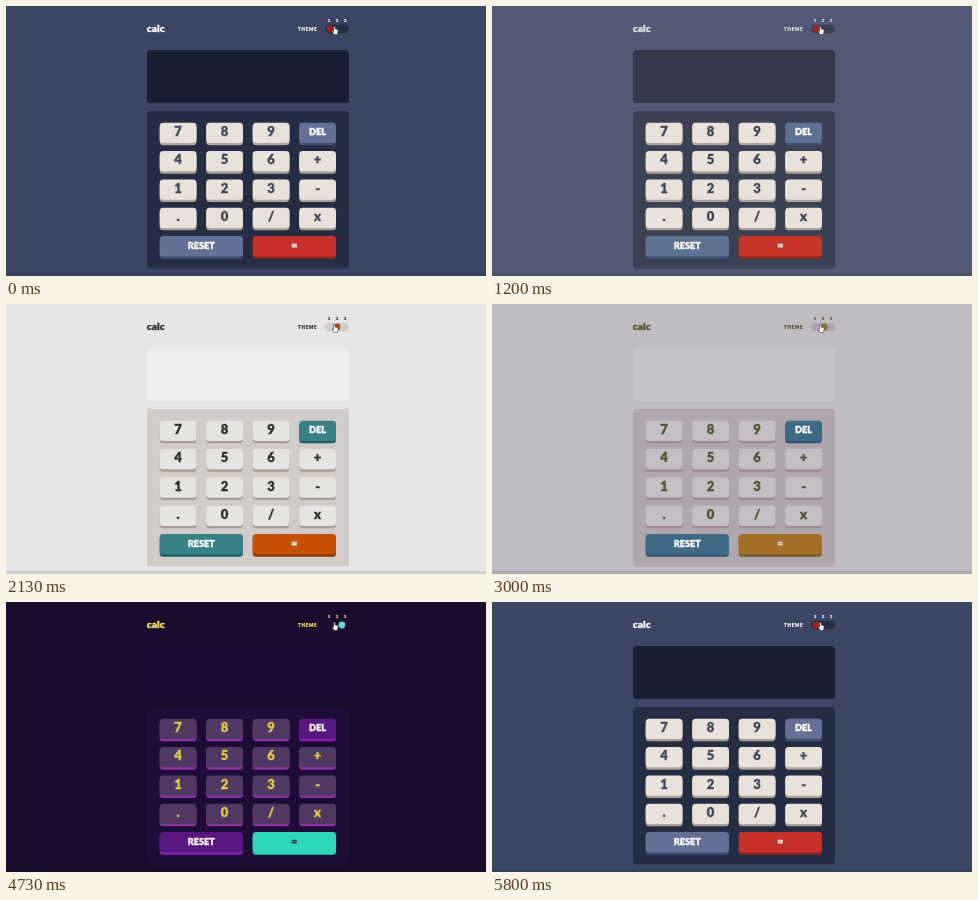
Write an HTML page that moves like this. It is 480 by 270 pixels and loops after 6.07 s.

```html
<!DOCTYPE html>
<html lang="en">
<head>
<meta charset="utf-8">
<title>Calculator themes</title>
<style>
html, body { margin: 0; width: 100%; height: 100%; overflow: hidden; }
svg {
  display: block; width: 100%; height: 100%;
  font: 900 13px Lato, sans-serif; text-anchor: middle;
  background: var(--bg);
  animation: theme 6070ms infinite paused;
}
/* A thin outline in the text colour gives the heavier letter weight. */
text { stroke-width: .3px; }
.screen { fill: var(--screen); }
.panel { fill: var(--panel); }
.head { fill: var(--head); stroke: var(--head); }
.head .small { stroke-width: .15px; }
.knob { fill: var(--knob); cx: var(--knob-x); }
.key .base { fill: var(--key-base); }
.key .face { fill: var(--key); }
.key text { fill: var(--key-text); stroke: var(--key-text); }
.action .base { fill: var(--action-base); }
.action .face { fill: var(--action); }
.action text { fill: #fff; stroke: #fff; font-size: 9.2px; }
.equal .base { fill: var(--equal-base); }
.equal .face { fill: var(--equal); }
.equal text { fill: var(--equal-text); stroke: var(--equal-text); font-size: 10.5px; }

/* Each theme holds, then eases into the next one. */
@keyframes theme {
  0%, 18.67%, 86.3%, 100% {
    --bg: #3a4663; --screen: #181f33; --panel: #242d44;
    --head: #ffffff; --knob: #a3201f; --knob-x: 324px;
    --key: #e8e2da; --key-base: #b0a295; --key-text: #434859;
    --action: #647096; --action-base: #414e73;
    --equal: #c8302c; --equal-base: #93261a; --equal-text: #ffffff;
    animation-timing-function: ease;
  }
  27.9%, 48.33% {
    --bg: #e6e6e6; --screen: #eeeeee; --panel: #d1cbca;
    --head: #2f2f2b; --knob: #a5480f; --knob-x: 331px;
    --key: #e5e4e1; --key-base: #a79e95; --key-text: #2f2f2b;
    --action: #378187; --action-base: #1b6066;
    --equal: #c65003; --equal-base: #873901; --equal-text: #ffffff;
    animation-timing-function: ease;
  }
  55.6%, 76.7% {
    --bg: #150223; --screen: #1c0631; --panel: #1c0632;
    --head: #ffe53d; --knob: #60f4e6; --knob-x: 338px;
    --key: #331b4d; --key-base: #871c9e; --key-text: #ffe53d;
    --action: #56077c; --action-base: #9a14c8;
    --equal: #14f5d2; --equal-base: #14f5d2; --equal-text: #1b2428;
    animation-timing-function: ease;
  }
}
</style>
<script>
const colours = ["bg", "screen", "panel", "head", "knob", "key", "key-base", "key-text",
  "action", "action-base", "equal", "equal-base", "equal-text"];
const register = (name, syntax, initialValue) =>
  CSS.registerProperty({ name: "--" + name, syntax, inherits: true, initialValue });
colours.forEach(name => register(name, "<color>", "#000"));
register("knob-x", "<length>", "324px");
</script>
</head>
<body>
<svg viewBox="0 0 480 270" preserveAspectRatio="none">
  <rect y="267" width="480" height="3" opacity=".1"/>
  <g class="head">
    <text x="149.7" y="26" font-size="10.2">calc</text>
    <text class="small" x="301.7" y="24.6" font-size="4.5" letter-spacing=".7">THEME</text>
    <g font-size="4.4">
      <text class="small" x="323" y="16.2">1</text>
      <text class="small" x="331" y="16.2">2</text>
      <text class="small" x="339" y="16.2">3</text>
    </g>
  </g>
  <rect class="panel" x="319" y="18.8" width="24" height="8.4" rx="4.2"/>
  <circle class="knob" cy="23" r="3.4"/>
  <rect class="screen" x="141" y="44" width="202" height="53" rx="3.5"/>
  <rect class="panel" x="141" y="105" width="202" height="157.5" rx="4"/>
  <g id="keys"></g>
  <path d="M327.6 20.7q.8-.9 1.6 0v2.4l2.2.5q.9.3.8 1.2l-.5 2.2-.5 1.5h-2.9l-2-2.7q-.4-.9.4-1l.9.7z"
    fill="#fff" stroke="#181820" stroke-width=".5" stroke-linejoin="round"/>
</svg>
<script>
const keys = document.getElementById("keys");

function addKey(label, col, row, kind = "key", width = 36.8) {
  const x = 153.7 + col * 46.5;
  const y = 116.7 + row * 28.35;
  const baseline = y + (kind === "action" ? 12.6 : 13.2);
  keys.insertAdjacentHTML("beforeend", `<g class="${kind}">
    <rect class="base" x="${x}" y="${y + 2}" width="${width}" height="20.6" rx="3.5"/>
    <rect class="face" x="${x}" y="${y}" width="${width}" height="20.3" rx="3.5"/>
    <text x="${x + width / 2}" y="${baseline}">${label}</text></g>`);
}

["7", "8", "9", "DEL", "4", "5", "6", "+", "1", "2", "3", "-", ".", "0", "/", "x"].forEach(
  (label, i) => addKey(label, i % 4, Math.floor(i / 4), label === "DEL" ? "action" : "key"));
addKey("RESET", 0, 4, "action", 83.3);
addKey("=", 2, 4, "equal", 83.3);

// The picture advances 15 times a second.
const loop = 6070;
const step = 1000 / 15;
const [animation] = document.querySelector("svg").getAnimations();

function draw() {
  const time = performance.now() % loop;
  animation.currentTime = Math.floor((time + 4) / step) * step;
  requestAnimationFrame(draw);
}
draw();
</script>
</body>
</html>
```
